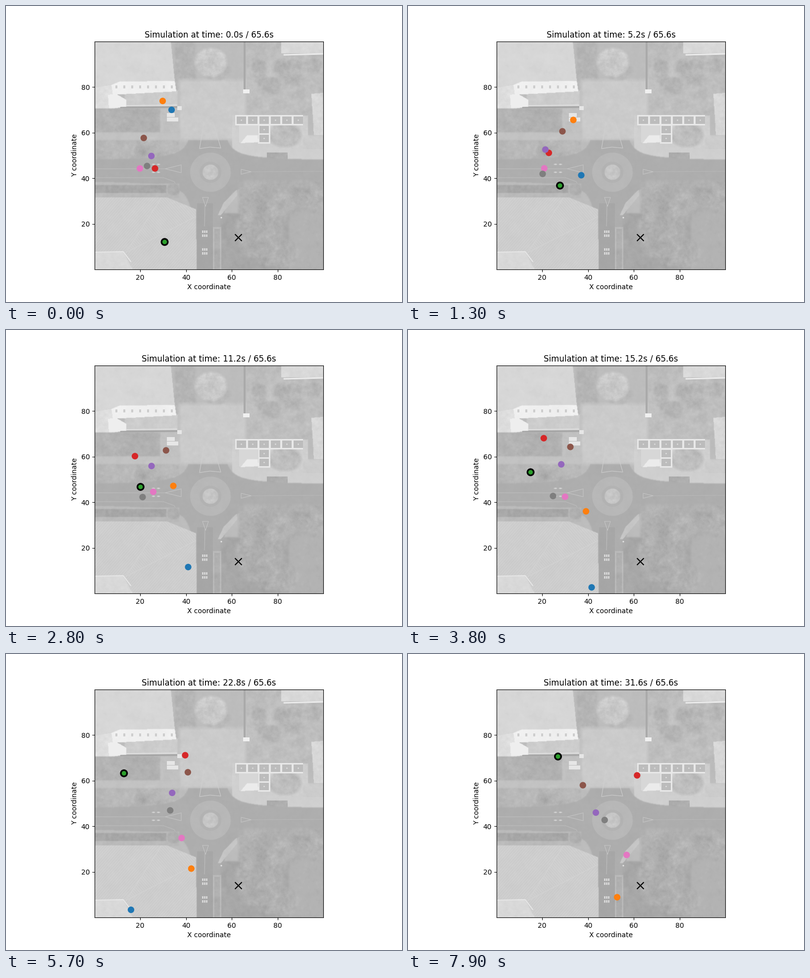
Write a matplotlib script that moves like this. It is 800x600 px and loops after 8000 ms.

```python
import numpy as np
import matplotlib.pyplot as plt
from matplotlib.animation import FuncAnimation
from matplotlib.path import Path

FRAMES, STEP = 80, 0.4
LEFT, RIGHT, TOP, BOTTOM = 179, 641, 72, 534  # axes box in stage pixels
SIZE = RIGHT - LEFT
UNIT = SIZE / 99.8  # the axes run from 0.1 to 99.9

rng = np.random.default_rng(7)
X, Y = np.meshgrid(LEFT + 0.5 + np.arange(SIZE), TOP + 0.5 + np.arange(SIZE))
FREQ2 = np.fft.fftfreq(SIZE)[:, None] ** 2 + np.fft.rfftfreq(SIZE)[None] ** 2


# ---------- aerial view: a few soft grey shapes ----------
def blur(a, s):
    kernel = np.exp(-2 * np.pi ** 2 * s ** 2 * FREQ2)
    return np.fft.irfft2(np.fft.rfft2(a) * kernel, (SIZE, SIZE))


def noise(s):
    n = blur(rng.normal(size=(SIZE, SIZE)), s)
    return n / n.std()


FOLIAGE = 0.3 * noise(0.8) + 0.6 * noise(2.2) + 0.7 * noise(7)
ground = 188 + FOLIAGE


def paint(mask, tone, grain=0.0):
    global ground
    ground = ground * (1 - mask) + mask * (tone + grain * FOLIAGE)


def poly(points, tone, grain=0, soft=0.5):
    inside = Path(points).contains_points(np.c_[X.ravel(), Y.ravel()])
    paint(np.clip(blur(inside.reshape(X.shape).astype(float), soft), 0, 1), tone, grain)


def rect(x0, y0, x1, y1, tone, grain=0, soft=0.5):
    edge = np.minimum(np.minimum(X - x0, x1 - X), np.minimum(Y - y0, y1 - Y))
    paint(np.clip(edge / (2 * soft) + 0.5, 0, 1), tone, grain)


def disc(x, y, rx, ry, tone, grain=0, soft=0.7):
    gap = (1 - np.hypot((X - x) / rx, (Y - y) / ry)) * min(rx, ry)
    paint(np.clip(gap / (2 * soft) + 0.5, 0, 1), tone, grain)


def line(points, tone, width=1.0):
    mask = np.zeros_like(X)
    for (x0, y0), (x1, y1) in zip(points, points[1:]):
        dx, dy = x1 - x0, y1 - y0
        u = np.clip(((X - x0) * dx + (Y - y0) * dy) / (dx * dx + dy * dy), 0, 1)
        far = np.hypot(X - x0 - u * dx, Y - y0 - u * dy)
        mask = np.maximum(mask, np.clip(width / 2 + 0.5 - far, 0, 1))
    paint(mask, tone)


def grove(x0, y0, x1, y1, count, size, tone, grain=4):
    for _ in range(count):
        rx, ry = size * rng.uniform(0.7, 1.2, 2)
        disc(rng.uniform(x0, x1), rng.uniform(y0, y1), rx, ry,
             tone + rng.uniform(-4, 4), grain, 3)


def plaza():
    rect(340, 72, 384, 180, 181, 3, 4)
    rect(350, 150, 485, 272, 202, 1.5, 5)
    disc(424, 130, 30, 20, 180, 3, 3)
    disc(414, 114, 32, 29, 200, 5, 3)


def gardens():
    rect(487, 72, 641, 220, 189, 3, 2)
    grove(505, 120, 625, 185, 10, 17, 181)
    line([(482, 72), (482, 170)], 170, 4)
    rect(479, 169, 492, 177, 240)
    rect(556, 72, 641, 96, 216, 2)
    line([(562, 99), (641, 97)], 235, 3)
    poly([(617, 178), (641, 176), (641, 262), (622, 262)], 216, 3)


def west_house():
    rect(240, 172, 347, 202, 203, 2, 2)
    rect(179, 160, 220, 208, 224, 3)
    poly([(206, 180), (222, 178), (243, 190), (243, 205), (208, 208)], 238)
    poly([(179, 72), (333, 72), (341, 152), (213, 160), (179, 166)], 214, 1)
    poly([(213, 160), (230, 153), (341, 152), (344, 173), (216, 180)], 239, 1)
    for x in range(221, 340, 16):
        rect(x, 161, x + 4, 167, 205)
    line([(243, 202), (345, 201)], 225, 2)
    line([(232, 206), (345, 205)], 165, 3)


def west_gardens():
    rect(179, 208, 312, 256, 177, 3, 2)
    rect(312, 208, 350, 256, 192, 2, 2)
    rect(179, 257, 350, 273, 194, 1.5, 2)
    rect(179, 272, 350, 315, 182, 3, 2)
    grove(195, 285, 335, 298, 6, 16, 177)
    for x, y, w in [(325, 217, 16), (325, 226, 23), (346, 203, 9)]:
        rect(x, y, x + w, y + 8, 230)


def court():
    rect(457, 222, 610, 300, 207, 2, 1)
    rect(600, 262, 641, 318, 203, 2, 2)
    disc(503, 275, 46, 43, 207, 1)
    rect(500, 290, 641, 318, 207, 1)
    disc(563, 262, 34, 24, 188, 4, 3)
    rect(527, 297, 569, 311, 174, 3)

    # glazed wing: a row of six bays and a column of two
    rect(463, 221, 600, 242, 232)
    rect(509, 240, 534, 279, 232)
    bays = [(466 + 23 * i, 224) for i in range(6)] + [(512, 243), (512, 261)]
    for x, y in bays:
        rect(x, y, x + 19, y + 15, 188)
        disc(x + 9.5, y + 7.5, 1.3, 1.3, 225)
    rect(471, 242, 510, 277, 215)
    poly([(474, 278), (487, 262), (509, 262), (510, 276)], 235)


def roads():
    dx, dy = np.abs(X - 408) - 22, np.abs(Y - 334) - 19
    paved = ((dx < 0) | (dy < 0) | (dx * dy < 750)) & (Y > 272)
    paint(np.clip(blur(paved.astype(float), 1), 0, 1), 173, 0.7)
    rect(386, 400, 418, 534, 166, 0.7)
    for r, tone, grain in [(41, 183, 0.7), (22, 178, 0.7), (16, 195, 4)]:
        disc(413, 337, r, r * 0.97, tone, grain)
    line([(179, 330), (322, 330)], 190)
    line([(179, 348), (318, 348), (340, 356), (352, 380)], 189)
    line([(495, 336), (641, 335)], 184)
    line([(400, 235), (391, 289), (412, 286), (434, 288), (418, 235)], 207)
    line([(402, 405), (401, 446)], 191)
    for x, y, ex, ey in [(322, 330, 32, 0), (495, 336, -20, 0), (403, 406, 0, -18)]:
        wx, wy = -ey / 3, ex / 4
        line([(x, y), (x + ex + wx, y + ey + wy), (x + ex - wx, y + ey - wy), (x, y)], 199)
    for x in (298, 308):
        for y in (321, 337):
            disc(x, y, 3, 1.3, 212)
    for x in (396, 400, 404):
        for y in (455, 463, 491, 499):
            rect(x, y, x + 3, y + 5, 214)


def south_house():
    rect(179, 360, 350, 389, 185, 2, 1)
    rect(179, 363, 324, 379, 166, 3, 1)
    disc(338, 372, 13, 12, 172, 3, 2)

    # ribbed roof: rib direction changes across the two ridges
    bearing = np.arctan2(500 - Y, X - 242)
    middle = (bearing > 0.48) & (bearing < 0.99)
    ribs = np.sin((0.75 * X + np.where(middle, -0.66, 0.66) * Y) * 1.5)
    poly([(179, 388), (325, 388), (384, 412), (385, 534), (179, 534)],
         205 + 2.5 * ribs, 0.8)
    for end in [(314, 389), (383, 427)]:
        line([(242, 500), end], 212)
    poly([(179, 499), (236, 497), (256, 534), (179, 534)], 216, 2)
    line([(179, 499), (237, 498), (252, 518)], 230, 2)


def park():
    rect(434, 420, 641, 534, 168, 2, 2)
    rect(572, 415, 641, 534, 178, 1.5, 3)
    rect(470, 354, 641, 420, 177, 3, 4)
    poly([(428, 424), (440, 398), (466, 373), (467, 384), (434, 424)], 197, 1)
    grove(490, 380, 565, 515, 14, 26, 177)
    grove(600, 375, 630, 395, 3, 25, 177)
    rect(418, 448, 435, 534, 186, 2)
    rect(421, 452, 432, 534, 175, 3)
    disc(435, 429, 1.5, 1.5, 230)


for part in (plaza, gardens, west_house, west_gardens, court, roads, south_house, park):
    part()

# ---------- motion ----------
KEYS = np.array([0, 13, 28, 38, 57, 69, 79])


def track(*points):
    """Smooth cubic path through the points, one row per frame."""
    p = np.array(points, float)
    slope = np.gradient(p, KEYS, axis=0)
    f = np.arange(FRAMES)
    i = np.clip(np.searchsorted(KEYS, f, side="right") - 1, 0, len(KEYS) - 2)
    h = (KEYS[i + 1] - KEYS[i])[:, None]
    u = (f - KEYS[i])[:, None] / h
    return ((1 + 2 * u) * (1 - u) ** 2 * p[i] + u * (1 - u) ** 2 * h * slope[i]
            + u * u * (3 - 2 * u) * p[i + 1] + u * u * (u - 1) * h * slope[i + 1])


tracks = np.array([
    track((334.5, 210.5), (350, 343), (368, 480.5), (371, 521.7), (252.5, 518.5),
          (160, 516), (80, 516)),
    track((316.5, 192.5), (334, 231), (338, 316), (359.6, 367.5), (374.3, 435),
          (399.5, 464.5), (422.5, 493)),
    track((320.5, 478.3), (307, 364), (271.8, 318), (247.6, 288.3), (238.3, 241.8),
          (268.8, 226), (303, 207.8)),
    track((301, 329.3), (284.5, 297.7), (260.5, 255.7), (274.3, 219.3), (362, 205.2),
          (416.8, 227.3), (462.8, 246)),
    track((293.7, 304), (277.5, 291), (294, 275.7), (309.6, 272.3), (335.7, 281.5),
          (365, 289.5), (379.5, 321.5)),
    track((278.3, 267.5), (312, 254), (323.3, 244), (328, 237), (367.4, 239.7),
          (364.5, 257), (353.3, 266)),
    track((270.5, 329.3), (275.3, 329), (297.5, 328), (317.3, 338), (354.7, 373),
          (405, 392), (441.7, 407.3)),
    track((285, 324.3), (272, 340.3), (276, 338.7), (293, 336.5), (331.7, 317),
          (368.7, 312.3), (397.3, 336.5)),
])

# ---------- figure ----------
fig, ax = plt.subplots(figsize=(8, 6), dpi=100)
ax.imshow(np.clip(ground, 150, 250), cmap="gray", vmin=0, vmax=255,
          extent=(LEFT, RIGHT, BOTTOM, TOP), interpolation="nearest")
ax.set_xlim(LEFT, RIGHT)
ax.set_ylim(BOTTOM, TOP)
values = np.arange(20, 100, 20)
ax.set_xticks(LEFT + UNIT * (values - 0.1), values)
ax.set_yticks(BOTTOM - UNIT * (values - 0.1), values)
ax.set_xlabel("X coordinate")
ax.set_ylabel("Y coordinate")
title = ax.set_title("")

colors = [f"C{i}" for i in range(8)]
edges, sizes, widths = colors.copy(), [64] * 8, [1.5] * 8
edges[2], sizes[2], widths[2] = "black", 82, 2.4  # highlighted agent
ax.scatter(469.4, 469.4, s=100, marker="x", color="black")
dots = ax.scatter(*tracks[:, 0].T, s=sizes, c=colors, edgecolors=edges, linewidths=widths)


def update(frame):
    title.set_text(f"Simulation at time: {frame * STEP:.1f}s / 65.6s")
    dots.set_offsets(tracks[:, frame])
    return title, dots


anim = FuncAnimation(fig, update, frames=FRAMES, interval=100, repeat=True)
plt.show()
```
